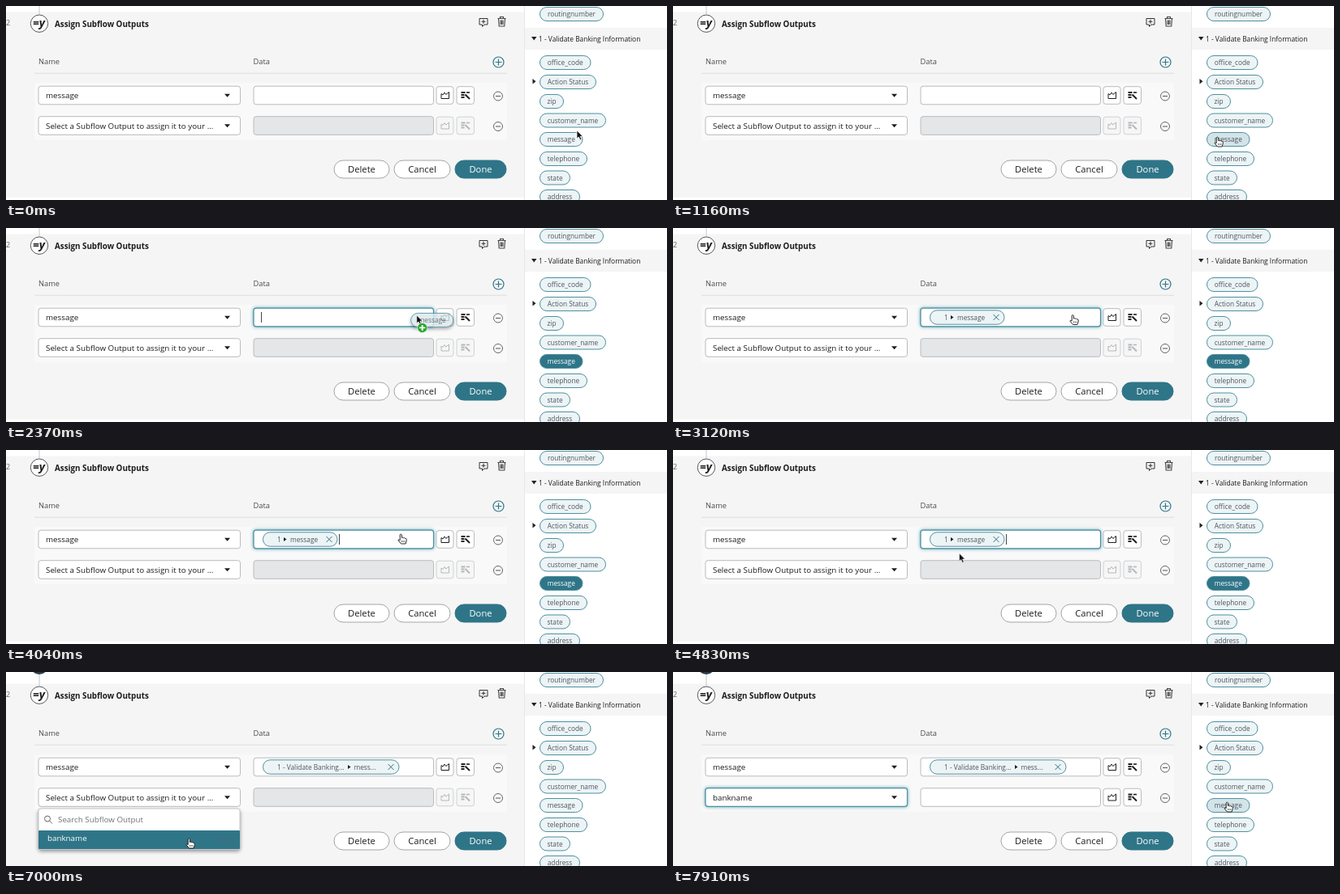
Write an HTML page that moves like this. It is 814 px wide and 240 px high and loops after 8000 ms.

```html
<!DOCTYPE html>
<html lang="en">
<head>
<meta charset="utf-8">
<title>Assign Subflow Outputs</title>
<style>
html, body { margin: 0; width: 100%; height: 100%; overflow: hidden; background: #fff; }
svg { display: block; width: 814px; height: 240px; font-family: "Open Sans", "Noto Sans", sans-serif; }
.shadow { filter: drop-shadow(0 2px 2px #0006); }
.glow { filter: drop-shadow(0 0 2px #5fa9bd); }
</style>
</head>
<body>
<svg id="stage" viewBox="0 0 814 240"></svg>
<script>
const LOOP = 8000, TEAL = '#2f7588', EDGE = '#4f909f', INK = '#1d1d1f';
const stage = document.getElementById('stage');

// Moments at which the state changes
const GRAB = 1700, LIFT = 1990, OVER = 2130, DROP = 2580, OPEN = 5280, PICK = 7100;

// Pointer stops: time, x, y
const stops = [
  [40, 703, 154], [830, 672, 163], [1000, 672, 163], [1500, 664, 159],
  [1740, 664, 159], [1900, 538, 122], [1990, 538, 122], [2360, 506, 108],
  [2500, 489, 106], [2700, 489, 106], [3330, 493, 108], [3580, 493, 108],
  [4030, 486, 104], [4370, 486, 104], [5160, 272, 142], [6040, 272, 142],
  [6830, 225, 206], [7200, 225, 206], [7700, 513, 116], [7740, 513, 116], [7905, 682, 161]
];

const clamp = v => Math.max(0, Math.min(1, v));
const ease = v => (v = clamp(v), v * v * (3 - 2 * v));
const between = (t, a, b) => t >= a && t < b;

function pointerAt(t) {
  const i = stops.findIndex(s => s[0] > t);
  if (i === 0) return stops[0].slice(1);
  if (i < 0) return stops[stops.length - 1].slice(1);
  const [a, x0, y0] = stops[i - 1], [b, x1, y1] = stops[i];
  const k = ease((t - a) / (b - a));
  return [x0 + (x1 - x0) * k, y0 + (y1 - y0) * k];
}

const text = (x, y, str, size = 9.8, fill = INK, more = '') =>
  `<text x="${x}" y="${y}" font-size="${size}" fill="${fill}" ${more}>${str}</text>`;
const rect = (x, y, w, h, fill, stroke = 'none', r = 0, more = '') =>
  `<rect x="${x}" y="${y}" width="${w}" height="${h}" rx="${r}" fill="${fill}" stroke="${stroke}" ${more}/>`;
const path = (d, stroke = INK, fill = 'none', more = '') =>
  `<path d="${d}" stroke="${stroke}" fill="${fill}" ${more}/>`;
const circle = (x, y, r, fill, stroke = 'none', more = '') =>
  `<circle cx="${x}" cy="${y}" r="${r}" fill="${fill}" stroke="${stroke}" ${more}/>`;
const group = (x, y, body, more = '') => `<g transform="translate(${x} ${y})" ${more}>${body}</g>`;

const pill = (x, y, w, label, fill = '#edf4f6', color = '#4d5560') =>
  rect(x, y - 8.5, w, 17, fill, EDGE, 8.5) +
  text(x + w / 2, y + 3, label, 8.3, color, 'text-anchor="middle"');

const caret = (t, since, x, y) =>
  Math.floor((t - since) / 500) % 2 ? '' : path(`M${x} ${y - 6.5}v13`, '#444');

function box(x, y, w, fill = '#fff', focus = 0) {
  const base = rect(x, y - 11.3, w, 22.6, fill, '#b9bbbe', 3);
  return base + (focus ? rect(x, y - 11.3, w, 22.6, '#fff', EDGE, 3,
    `class="glow" stroke-width="1.2" opacity="${focus}"`) : '');
}

function iconButtons(y, on) {
  const c = on ? INK : '#b4b7bb', fill = on ? '#fff' : '#f6f6f6', edge = on ? '#b9bbbe' : '#cfd1d4';
  return rect(530, y - 10.8, 21, 21.6, fill, edge, 3) + rect(555, y - 10.8, 21.5, 21.6, fill, edge, 3) +
    path(`M536 ${y - 2}v6h9.500v-8M536 ${y - 2}l2 1.500l2 -3l1.800 2.500l3.700 -3`, c) +
    path(`M560.500 ${y - 3.500}h5M560.500 ${y - .5}h4M560.500 ${y + 2.500}h4M565.500 ${y - 1}l5.500 5.500`, c, 'none', 'stroke-width="1.9"') +
    path(`M567 ${y - 3.500}h4`, c, 'none', 'stroke-width="1.6"');
}

function row(y, label, enabled, nameFocus, dataFocus) {
  return box(40, y, 248.5, '#fff', nameFocus) + text(49, y + 3.7, label) +
    path(`M269 ${y - 1.7}h7l-3.500 4z`, 'none', INK) +
    box(305, y, 221.500, enabled ? '#fff' : '#e5e6e7', dataFocus) + iconButtons(y, enabled) +
    circle(606, y + 1, 5.5, 'none', '#666') + path(`M603 ${y + 1}h6`, '#555');
}

function dataPill(t) {
  const wide = t >= OPEN, x = 316.5, w = wide ? 167.5 : 91.5, y = 110.5;
  const arrowX = wide ? 421 : 342;
  return rect(x, y - 8.7, w, 17.4, '#edf4f6', EDGE, 8.7) +
    text(334, y + 3, wide ? '1 - Validate Banking...' : '1', 8.3, '#4d5560') +
    path(`M${arrowX} ${y - 2.500}l3.500 2.500l-3.500 2.500z`, 'none', INK) +
    text(wide ? 428.5 : 350, y + 3, wide ? 'mess...' : 'message', 8.3, '#4d5560') +
    path(`M${x + w - 13.5} ${y - 3.5}l7 7m0 -7l-7 7`, TEAL);
}

function dropdown(t) {
  return rect(40, 162, 248, 50.5, '#fff', '#c3c7cb', 3, 'class="shadow"') +
    circle(51, 174.500, 3.5, 'none', '#666') + path('M53.500 177l3.500 3.500', '#666') +
    text(64, 179, 'Search Subflow Output', 9.8, '#707378') +
    rect(40, 189, 248, 23, TEAL, 'none', 1) + text(51, 202, 'bankname', 9.8, '#fff') +
    text(258, 202, 'String', 8.3, '#456d79') +
    (t < 6800 ? caret(t, 5450, 63.5, 175.5) : '');
}

function form(t) {
  const dataFocus = between(t, 1800, OVER) ? .55 : between(t, OVER, OPEN) ? 1 : 0;
  const picked = t >= PICK;
  return rect(0, 7.5, 638, 229.3, '#f5f5f5') +
    path('M41 -4V10', '#c4c6ca') + circle(41, -15, 11, '#2d3b47') +
    text(0, 24.3, '2', 9, '#666') +
    circle(41, 21.7, 10.7, '#fff', '#55585c') +
    text(40.5, 25.7, '=y', 14, INK, 'text-anchor="middle" font-weight="700" font-style="italic"') +
    text(60, 25.5, 'Assign Subflow Outputs', 9.8, INK, 'font-weight="700"') +
    path('M583 15.500h10v7.500h-4l-2.500 2.500v-2.500h-3.500zM588 16.800v5M585.500 19.300h5', '#333') +
    path('M605.500 15.500h10M608.500 15v-1.500h4v1.500M606.500 15.500l.7 9.500h6.600l.7 -9.500M609 17.500v5.500M610.500 17.500v5.500M612 17.500v5.500', '#444', 'none', 'stroke-width="1.1"') +
    text(40, 72, 'Name', 9.3, '#4a4c50') + text(304.5, 72, 'Data', 9.3, '#4a4c50') +
    circle(606.5, 69.5, 6.5, 'none', TEAL, 'stroke-width="1.2"') +
    path('M602.500 69.500h8M606.500 65.500v8', TEAL, 'none', 'stroke-width="1.2"') +
    path('M35 83.200H617', '#dcdddf') + rect(35, 95, 582, 71, '#f9f9f9') +
    row(110.5, 'message', true, 0, dataFocus) +
    row(148, picked ? 'bankname' : 'Select a Subflow Output to assign it to your ...', picked, picked ? 1 : 0, 0) +
    (between(t, OVER, DROP) ? caret(t, OVER, 314.5, 110.5) : '') +
    (t >= DROP ? dataPill(t) : '') +
    (between(t, DROP, OPEN) ? caret(t, DROP, 410.5, 110.5) : '') +
    [['Delete', 404, 68], ['Cancel', 478, 69], ['Done', 553, 63]].map(([label, x, w]) => {
      const main = label === 'Done';
      return rect(x, 191, w, 22, main ? TEAL : '#fff', main ? TEAL : '#a2a5a8', 11) +
        text(x + w / 2, 206, label, 11.2, main ? '#fff' : INK, 'text-anchor="middle"');
    }).join('') +
    (between(t, OPEN + 80, PICK) ? dropdown(t) : '');
}

const outputs = [
  ['routingnumber', 10, 78], ['office_code', 70, 62.5], ['Action Status', 94, 69], ['zip', 118, 29],
  ['customer_name', 141.5, 81], ['message', 165, 52.5], ['telephone', 189, 58],
  ['state', 212.5, 37], ['address', 236, 49]
];

function sidebar(t) {
  const hover = between(t, 350, GRAB) || t > 7870;
  const dragged = between(t, GRAB, OPEN);
  return rect(638, 0, 176, 240, '#fff') + rect(639, 27, 175, 27, '#f5f5f5') +
    path('M638.500 0V240', '#e6e7e8') +
    path('M647 38h6.500l-3.250 4.500z', 'none', '#222') + path('M648.500 90l4 3.300l-4 3.300z', 'none', '#222') +
    text(656, 44, '1 - Validate Banking Information', 8.4) +
    outputs.map(([label, y, w]) => {
      const active = label === 'message';
      return active && dragged ? pill(657.5, y, w, label, TEAL, '#fff')
        : pill(657.5, y, w, label, active && hover ? '#d3e4e8' : undefined);
    }).join('');
}

function ghost(t, x, y) {
  const k = ease((t - LIFT) / 100);
  const gx = 657 + (x - 7 - 657) * k, gy = 162 + (y + 6 - 162) * k;
  return `<g class="shadow" opacity="${.95 - .13 * k}">${pill(gx, gy, 52, 'message', k < .5 ? '#bfd8dd' : '#dce9ec')}</g>`;
}

function pointer(t, x, y) {
  const hand = between(t, 350, GRAB) || between(t, 2900, 4600) || between(t, 6550, 7250) || t > 7870;
  const shape = hand
    ? path('M-.8 7V.8Q.3 -.6 1.400 .8V4.500Q2.500 3.700 3.500 4.800Q4.700 4.200 5.500 5.300Q7 5 7.200 6.500V8.500L6 12H.5L-3 7.800Q-3.200 6 -.8 7.500z',
        '#111', '#fff', 'stroke-width=".9" stroke-linejoin="round"') + path('M1.500 8v2M3.200 8v2M4.900 8v2', '#111', 'none', 'stroke-width=".6"')
    : path('M0 0V10L2.300 8L4 11.700L5.800 10.900L4.200 7.300H7.200z', '#fff', '#111', 'stroke-width=".7"');
  const badge = between(t, OVER, DROP)
    ? circle(7, 15.5, 6, '#27a52c', '#fff', 'stroke-width=".6"') + path('M3.500 15.500h7M7 12v7', '#fff', 'none', 'stroke-width="1.8"') : '';
  return group(x, y, shape + badge);
}

function draw(now) {
  const t = now % LOOP;
  const [x, y] = pointerAt(t);
  const scroll = 7 * ease((t - OPEN) / 150);
  const bar = t < OPEN ? 0 : 1 - clamp((t - 6040) / 300);
  stage.innerHTML = group(0, scroll, form(t)) +
    rect(632, 53, 5, 144, '#77797c', 'none', 2.5, `opacity="${bar}"`) +
    sidebar(t) + (between(t, GRAB + 80, DROP) ? ghost(t, x, y) : '') + pointer(t, x, y);
}

const start = performance.now();
function tick() {
  draw(performance.now() - start);
  requestAnimationFrame(tick);
}
tick();
</script>
</body>
</html>
```
